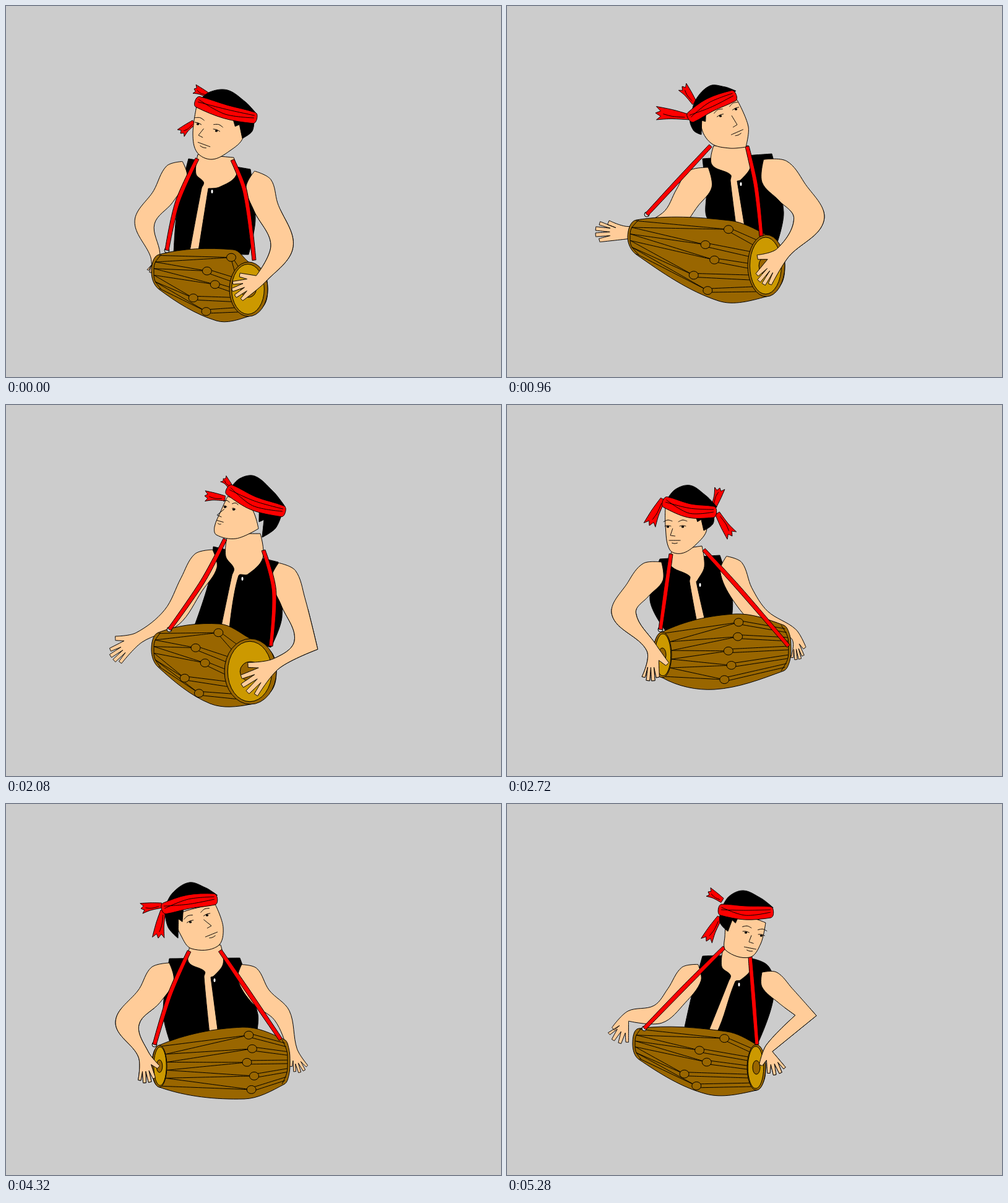
Write an HTML page with a canvas that moves like this. It is 800x600 px and loops after 5.44 s.

```html
<!DOCTYPE html>
<html lang="en">
<head>
<meta charset="utf-8">
<title>Drummer</title>
<style>
html, body { margin: 0; width: 100%; height: 100%; overflow: hidden; background: #ccc; }
canvas { display: block; }
</style>
</head>
<body>
<canvas id="stage" width="800" height="600"></canvas>
<script>
const ctx = document.getElementById('stage').getContext('2d');
const SKIN = '#ffcc99', RED = '#ff0000', BROWN = '#996600', GOLD = '#cc9900', BLACK = '#000';
const STEP = 160, LOOP = 5440;

// Key points of each pose; every outline is built from them.
// arm: shoulder, mid, elbow, wrist, girth, then hand angle, length, spread, thumb
// drumL, drumR: centre and radii; belly: top and bottom; features: eyes, nose, mouth
// vest: shoulders, right side, left side; skin: neck, top and foot of the slit
const poses = [
{ step: 0, front: 'R', bob: 0,
  armL: [276,268, 254,308, 224,350, 241,402, .9, 100,30,10,0],
  armR: [408,287, 420,325, 446,388, 412,441, 1, 152,50,13,38],
  vest: [295,247, 395,264, 403,345, 392,402, 271,400, 277,325],
  skin: [310,240, 368,245, 321,293, 303,402],
  strapL: [309,247, 277,318, 260,395], strapR: [366,249, 386,300, 401,411],
  drumL: [247,430,12,28], drumR: [392,458,31,44], belly: [367,394, 340,509],
  face: [308,162, 302,207, 309,237, 333,248, 362,234, 383,213, 380,185],
  features: [310,191, 340,202, 311,209, 320,224],
  band: [310,155, 355,171, 401,181], crown: [358,136], nape: [382,214],
  tails: [326,144, 304,134, 304,188, 282,206] },
{ step: 6, front: 'R', bob: -10,
  armL: [312,280, 292,309, 262,350, 201,366, 1.1, 181,58,10,22],
  armR: [432,268, 460,300, 488,345, 446,399, 1.25, 126,60,9,44],
  vest: [316,247, 428,239, 447,333, 436,385, 328,348, 322,300],
  skin: [334,226, 390,226, 366,281, 378,362],
  strapL: [329,226, 276,283, 226,337], strapR: [388,227, 402,290, 411,372],
  drumL: [209,374,14,28], drumR: [419,420,30,50], belly: [360,347, 342,477],
  face: [314,194, 330,222, 360,230, 386,228, 390,195, 372,152, 325,170],
  features: [345,178, 370,167, 372,192, 372,204],
  band: [297,180, 328,160, 366,145], crown: [328,129], nape: [314,208],
  tails: [303,157, 283,130, 296,180, 240,173] },
{ step: 13, front: 'R', bob: 22,
  armL: [323,252, 300,290, 268,343, 215,376, 1, 142,55,10,36],
  armR: [448,275, 464,318, 485,388, 437,418, 1, 141,66,12,36],
  vest: [335,229, 440,254, 446,343, 428,392, 305,356, 328,285],
  skin: [358,208, 411,208, 370,274, 354,362],
  strapL: [354,217, 318,285, 264,363], strapR: [416,235, 433,300, 428,390],
  drumL: [246,396,11,28], drumR: [395,431,42,53], belly: [345,354, 330,483],
  face: [358,148, 347,172, 337,197, 340,210, 372,216, 408,200, 395,165],
  features: [354,165, 368,169, 341,178, 346,188],
  band: [361,137, 400,159, 447,172], crown: [402,115], nape: [414,214],
  tails: [362,131, 351,119, 354,151, 321,147] },
{ step: 17, front: 'L', bob: 0,
  armL: [236,270, 212,298, 189,338, 233,392, 1, 91,54,9,-45],
  armR: [362,262, 380,305, 412,345, 463,370, .9, 80,42,9,-28],
  vest: [247,249, 344,243, 364,312, 363,345, 256,365, 231,315],
  skin: [267,235, 315,228, 300,284, 315,357],
  strapL: [265,241, 256,305, 248,363], strapR: [318,234, 376,298, 455,390],
  drumL: [251,404,15,37], drumR: [447,393,12,37], belly: [368,338, 335,460],
  face: [256,162, 256,195, 263,234, 282,240, 305,226, 323,200, 310,172],
  features: [260,197, 284,197, 264,211, 271,219],
  band: [256,157, 295,171, 334,173], crown: [296,130], nape: [318,203],
  tails: [252,152, 230,195, 334,165, 344,134, 340,175, 364,212] },
{ step: 23, front: 'L', bob: -12,
  armL: [246,256, 205,288, 172,320, 188,380, .95, 84,57,15,-52],
  armR: [388,255, 405,300, 428,345, 476,374, .9, 68,48,6,30],
  vest: [258,228, 376,230, 391,303, 378,345, 264,362, 249,306],
  skin: [303,245, 340,240, 319,268, 323,350],
  strapL: [283,220, 265,290, 244,358], strapR: [358,231, 400,290, 448,355],
  drumL: [245,402,15,37], drumR: [453,396,8,40], belly: [383,338, 388,465],
  face: [290,188, 286,235, 297,256, 325,256, 356,228, 352,205, 310,182],
  features: [306,217, 333,229, 309,237, 307,245],
  band: [299,168, 335,192, 379,200], crown: [347,143], nape: [363,228],
  tails: [310,150, 290,123, 300,166, 248,146] },
{ step: 27, front: 'L', bob: -16,
  armL: [253,275, 232,310, 196,355, 222,405, 1, 82,46,11,-42],
  armR: [390,275, 412,312, 446,342, 463,398, .85, 66,38,12,30],
  vest: [264,250, 378,249, 407,340, 405,370, 265,385, 254,338],
  skin: [298,228, 347,228, 325,278, 336,372],
  strapL: [296,238, 265,308, 240,389], strapR: [346,237, 389,300, 444,381],
  drumL: [248,424,12,34], drumR: [450,417,9,36], belly: [382,361, 385,477],
  face: [275,188, 283,213, 300,234, 342,230, 351,200, 338,162, 285,175],
  features: [298,191, 325,180, 332,197, 332,211],
  band: [256,169, 295,158, 337,154], crown: [296,127], nape: [278,217],
  tails: [252,164, 218,169, 254,172, 246,217] },
{ step: 33, front: 'R', bob: 0,
  armL: [298,275, 274,310, 244,340, 196,343, .9, 115,46,15,25],
  armR: [424,284, 450,310, 483,342, 424,395, .8, 72,44,13,45],
  vest: [316,246, 416,257, 431,310, 405,388, 286,366, 298,312],
  skin: [350,230, 391,236, 363,285, 331,372],
  strapL: [351,232, 290,293, 222,363], strapR: [393,247, 398,310, 404,389],
  drumL: [213,388,10,25], drumR: [403,426,15,37], belly: [355,368, 322,469],
  face: [358,188, 352,215, 354,237, 392,248, 410,226, 418,192, 385,182],
  features: [386,208, 411,213, 391,223, 393,233],
  band: [346,171, 385,176, 426,175], crown: [382,140], nape: [357,206],
  tails: [348,156, 325,142, 344,183, 322,222] }
];

const pairs = list => Array.from({ length: list.length >> 1 }, (_, i) => [list[2 * i], list[2 * i + 1]]);
const mix = (a, b, t) => [a[0] + (b[0] - a[0]) * t, a[1] + (b[1] - a[1]) * t];
const move = ([x, y], [dx, dy], k = 1) => [x + dx * k, y + dy * k];
const dist = (a, b) => Math.hypot(b[0] - a[0], b[1] - a[1]);
const unit = (a, b) => { const d = dist(a, b) || 1; return [(b[0] - a[0]) / d, (b[1] - a[1]) / d]; };
const polar = deg => [Math.cos(deg * Math.PI / 180), Math.sin(deg * Math.PI / 180)];
const side = ([x, y]) => [y, -x];

function mixPose(a, b, u) {
  const out = { front: u < .5 ? a.front : b.front };
  for (const key in a) if (Array.isArray(a[key]))
    out[key] = a[key].map((v, i) => v + ((b[key][i] ?? v) - v) * u);
  return out;
}

// Smooth line that keeps sharp turns as corners.
function trace(pts, closed) {
  const n = pts.length, at = i => pts[(i + n) % n];
  const dirs = pts.map((p, i) => {
    if (!closed && (i === 0 || i === n - 1)) return [0, 0];
    const a = unit(at(i - 1), p), b = unit(p, at(i + 1));
    return a[0] * b[0] + a[1] * b[1] < .3 ? [0, 0] : unit(at(i - 1), at(i + 1));
  });
  ctx.beginPath();
  ctx.moveTo(...pts[0]);
  for (let i = 0; i < (closed ? n : n - 1); i++) {
    const p = pts[i], q = at(i + 1), k = dist(p, q) / 3;
    ctx.bezierCurveTo(...move(p, dirs[i], k), ...move(q, dirs[(i + 1) % n], -k), ...q);
  }
  if (closed) ctx.closePath();
}

function shape(pts, fill) {
  trace(pts, true);
  ctx.fillStyle = fill;
  ctx.fill();
  ctx.stroke();
}

function stroke(...pts) { trace(pts, false); ctx.stroke(); }

function oval(x, y, rx, ry, fill) {
  ctx.beginPath();
  ctx.ellipse(x, y, rx, ry, 0, 0, 7);
  ctx.fillStyle = fill;
  ctx.fill();
  ctx.stroke();
}

// Both edges of a band of given half widths along a line.
function edges(line, widths) {
  const edge = sign => line.map((p, i) => {
    const a = line[i - 1] ? unit(line[i - 1], p) : unit(p, line[i + 1]);
    const b = line[i + 1] ? unit(p, line[i + 1]) : a;
    const cosHalf = Math.sqrt((1 + a[0] * b[0] + a[1] * b[1]) / 2);
    return move(p, side(unit([0, 0], move(a, b))), sign * widths[i] / Math.max(.75, cosHalf));
  });
  return [edge(1), edge(-1)];
}

function ribbon(line, widths, fill) {
  const [a, b] = edges(line, widths);
  shape([...a, ...b.reverse()], fill);
}

function drawArm(nums) {
  const line = pairs(nums.slice(0, 8));
  const [girth, angle, length, spread, thumb] = nums.slice(8);
  const widths = [21, 20, 16, 9].map(w => w * girth);
  const [a, b] = edges(line, widths);
  const reach = (deg, k) => move(line[3], polar(angle + deg), length * k);
  const fingers = [0, 1, 2, 3].flatMap(i => {
    const deg = (i - 1.5) * spread, long = i % 3 ? 1 : .92;
    const gap = i < 3 ? [reach(deg + spread / 2, .6)] : [];
    return [reach(deg - 3, long), reach(deg + 3, long), ...gap];
  });
  const tip = [reach(thumb - 5, .7), reach(thumb + 5, .7)];
  const web = reach(thumb * .7, .45);
  const hand = thumb < 0 ? [...tip, web, ...fingers] : [...fingers, web, ...tip];
  const cap = move(line[0], unit(line[1], line[0]), widths[0]);
  shape([cap, ...a, ...hand, ...b.reverse()], SKIN);
}

function drawTorso(p) {
  const [neckL, neckR, top, foot] = pairs(p.skin);
  const midY = t => neckR[1] + (top[1] - neckR[1]) * t;
  shape(pairs(p.vest), BLACK);
  shape([neckL, [neckL[0] - 3, midY(.55)], mix(neckL, top, .85), move(top, [-5, 2]),
    move(foot, [-7, 0]), move(foot, [7, 0]), move(top, [6, 2]),
    [(top[0] + neckR[0]) / 2, top[1]], [neckR[0] + 4, midY(.6)], neckR], SKIN);
  ctx.fillStyle = '#fff';
  ctx.beginPath();
  ctx.ellipse(top[0] + 12, top[1] + 7, 1.5, 3, 0, 0, 7);
  ctx.fill();
}

function drawDrum(p) {
  const [lx, ly, lw, lh] = p.drumL, [rx, ry, rw, rh] = p.drumR;
  const [top, bottom] = pairs(p.belly);
  const right = p.front === 'R', dir = right ? -1 : 1;
  const [faceX, faceY, faceW, faceH] = right ? p.drumR : p.drumL;
  const far = right ? p.drumL : p.drumR;
  const rim = ([x, y, w, h], v, inset = 0) =>
    [x + dir * (w * Math.sqrt(1 - v * v) - inset), y + h * v];
  const farRim = v => rim(far, v, 4);
  shape([[lx, ly - lh], top, [rx, ry - rh], [rx + rw * .8, ry - rh * .6], [rx + rw, ry],
    [rx + rw * .8, ry + rh * .6], [rx, ry + rh], bottom, [lx, ly + lh], [lx - lw, ly]], BROWN);
  stroke(...[-1, -.5, 0, .5, 1].map(farRim));
  const shift = right ? [0, -34, -16, -46, -20] : [10, 15, 6, 17, 12];
  const knobs = shift.map((dx, i) => move(mix(top, bottom, .11 + .19 * i), [dx, 0]));
  knobs.forEach((knob, i) => {
    const v = -.76 + .38 * i;
    for (const s of [-1, 1]) {
      const wide = v + s * .19, tight = v + s * .08;
      const from = right ? farRim(wide) : rim(p.drumL, wide);
      const to = right ? rim(p.drumR, tight) : farRim(tight);
      stroke(from, knob);
      stroke(move(knob, [0, s * 3]), to);
    }
  });
  for (const [x, y] of knobs) oval(x, y, 7.5, 6.5, BROWN);
  oval(faceX, faceY, faceW, faceH, BROWN);
  oval(faceX + dir, faceY, faceW * .85, faceH * .92, GOLD);
  oval(faceX, faceY, faceW * .4, faceH * .3, BROWN);
}

function drawTail(root, tip) {
  const along = unit(root, tip), length = dist(root, tip), w = 5 + length * .1;
  const at = (t, s) => move(mix(root, tip, t), side(along), s);
  shape([at(0, 4), at(.55, w * .6), at(.95, w), at(.84, w * .4), at(1, 0),
    at(.86, -w * .4), at(1, -w), at(.5, -w * .8), at(0, -4)], RED);
  stroke(at(.15, 1), at(.5, 2), at(.78, 0));
}

function drawHair(p) {
  const [start, mid, end] = pairs(p.band), [crown] = pairs(p.crown), [nape] = pairs(p.nape);
  const swell = (a, b) => move(mix(a, b, .5), unit(mid, mix(a, b, .5)), 8);
  const tuft = t => move(mix(crown, end, t), unit(mid, mix(crown, end, t)), 11);
  shape([start, swell(start, crown), crown, swell(crown, end), mix(tuft(.7), end, .1),
    tuft(.85), mix(crown, end, .85), end, mid], BLACK);
  const back = dist(nape, start) < dist(nape, end) ? start : end;
  const front = mix(mid, back, .2), edge = mix(front, nape, .5);
  shape([front, move(edge, unit(back, edge), 3), mix(edge, back, .15), nape,
    swell(nape, back), back], BLACK);
}

function drawFeatures(p) {
  const [eyeL, eyeR, nose, mouth] = pairs(p.features);
  const along = unit(eyeL, eyeR), up = side(along), mid = mix(eyeL, eyeR, .5);
  const w = Math.min(6, dist(eyeL, eyeR) * .22);
  const local = (o, x, y) => move(move(o, along, x), up, y);
  for (const eye of [eyeL, eyeR]) {
    stroke(local(eye, -w - 2, 8), local(eye, 0, 11), local(eye, w + 2, 9));
    stroke(local(eye, -w, 1), local(eye, 0, 2), local(eye, w, 1));
    ctx.fillStyle = BLACK;
    ctx.beginPath();
    ctx.ellipse(...eye, 2.2, 1.8, 0, 0, 7);
    ctx.fill();
  }
  const turn = Math.sign((nose[0] - mid[0]) * along[0] + (nose[1] - mid[1]) * along[1]);
  stroke(local(mix(mid, nose, .4), turn, 3), nose, local(nose, -turn * 8, -1));
  const lip = w * 1.8;
  stroke(local(mouth, -lip, 0), mouth, local(mouth, lip, 0));
  stroke(local(mouth, -lip / 2, -4), local(mouth, 0, -5), local(mouth, lip / 2, -4));
}

function drawHead(p) {
  const tails = pairs(p.tails), band = pairs(p.band);
  for (let i = 0; i < tails.length; i += 2) drawTail(tails[i], tails[i + 1]);
  shape(pairs(p.face), SKIN);
  drawHair(p);
  drawFeatures(p);
  const tips = [move(band[0], unit(band[1], band[0]), 4), ...band, move(band[2], unit(band[1], band[2]), 4)];
  ribbon(tips, [5, 9, 11, 9, 5], RED);
  const [upper, lower] = edges(band, [4, 4, 4]);
  stroke(band[0], upper[1], upper[2]);
  stroke(upper[0], lower[1], band[2]);
}

function draw(p) {
  const back = p.front === 'R' ? 'L' : 'R', frontArm = p['arm' + p.front];
  drawTorso(p);
  drawArm(p['arm' + back]);
  drawArm(frontArm);
  drawDrum(p);
  oval(...p.strapL.slice(4), 4, 4, '#ccc');
  ribbon(pairs(p.strapL), [3, 3.5, 3], RED);
  ribbon(pairs(p.strapR), [3, 3.5, 3], RED);
  // The playing hand lies over the drum, its shoulder under the strap.
  ctx.save();
  ctx.beginPath();
  ctx.rect(0, 330, 800, 270);
  ctx.clip();
  drawArm(frontArm);
  ctx.restore();
  drawHead(p);
}

function frame() {
  const step = Math.floor(performance.now() % LOOP / STEP);
  const i = poses.findLastIndex(p => p.step <= step);
  const a = poses[i], b = poses[(i + 1) % poses.length];
  const u = (step - a.step) / ((b.step || LOOP / STEP) - a.step);
  ctx.setTransform(1, 0, 0, 1, 0, 0);
  ctx.fillStyle = '#ccc';
  ctx.fillRect(0, 0, 800, 600);
  ctx.translate(0, a.bob * Math.sin(Math.PI * u));
  ctx.lineJoin = 'round';
  ctx.strokeStyle = BLACK;
  draw(mixPose(a, b, u));
  requestAnimationFrame(frame);
}
requestAnimationFrame(frame);
</script>
</body>
</html>
```
